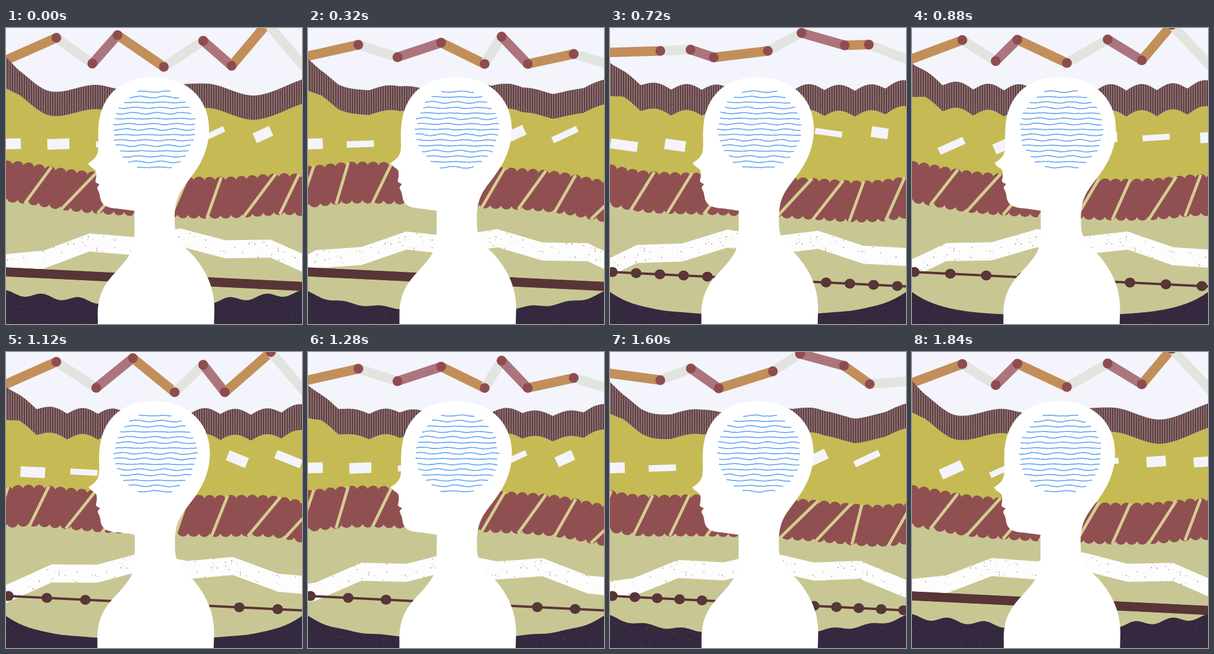
Animation, 500 px wide and 500 px high, one loop 1.92 s. Source, as an HTML page with a canvas:

```html
<!DOCTYPE html>
<html>
<head>
<meta charset="utf-8">
<style>
html, body { margin: 0; width: 100%; height: 100%; overflow: hidden; background: #f3f4fc; }
canvas { display: block; width: 500px; height: 500px; }
</style>
</head>
<body>
<canvas id="stage" width="500" height="500"></canvas>
<script>
const ctx = document.getElementById('stage').getContext('2d');
const FRAME = 80, COUNT = 24, TAU = Math.PI * 2;
const lerp = (a, b, t) => a + (b - a) * t;

// Two swings per loop: a plain one (-1 to 1) and one with a narrow peak (0 to 1)
const swing = (k, peak) => Math.cos(TAU * (k - peak) / 12);
const pulse = (k, peak) => ((1 + swing(k, peak)) / 2) ** 1.5;

function random(seed) {
  let s = seed * 7919 + 17;
  return () => {
    s = (s * 1664525 + 1013904223) % 4294967296;
    return s / 4294967296;
  };
}

// Smooth curve through [x, y] points, clamped at the ends
function curve(pts) {
  const last = pts.length - 1;
  const slope = i => {
    const a = pts[Math.max(i - 1, 0)], b = pts[Math.min(i + 1, last)];
    return (b[1] - a[1]) / (b[0] - a[0]);
  };
  return x => {
    if (x <= pts[0][0]) return pts[0][1];
    if (x >= pts[last][0]) return pts[last][1];
    let i = 0;
    while (pts[i + 1][0] < x) i++;
    const [x0, y0] = pts[i], [x1, y1] = pts[i + 1];
    const w = x1 - x0, t = (x - x0) / w, t2 = t * t, t3 = t2 * t;
    return y0 * (2 * t3 - 3 * t2 + 1) + y1 * (3 * t2 - 2 * t3) +
      w * (slope(i) * (t3 - 2 * t2 + t) + slope(i + 1) * (t3 - t2));
  };
}

// x, sway, sway peak, y, jump, jump peak
const joints = [
  [85, 0, 0, 16, 35, 7], [144.5, 8.5, 2.7, 61, -36, 7.1], [199, 26, 3.8, 10, 54, 7.3],
  [280, 19, 4.5, 68, -36, 7.6], [327, 7, 1, 22, -21, 7], [382.5, 14, 8.8, 68, -45, 7.8],
  [443, 6, 3.5, -8, 88, 6.2]
];

// lean, swing of the lean, peak
const slashes = [
  [25, 2, 0], [33, 14, 11], [42, 18, 0], [52, 5, 0], [40, 0, 0],
  [45, 22, 7.5], [44, 21, 6.7], [36, 22, 1], [48, 22, 4.5]
];

const smoothTop = curve([[0, 49], [25, 74], [75, 107], [150, 96], [200, 104], [340, 94], [420, 114], [500, 87]]);
const scallopTop = x => 106 - 46 * Math.exp(-x / 32) - 8 * (x / 500) ** 12 -
  11 * Math.abs(Math.sin(Math.PI * x / 51.7));

const edgeDistance = x => Math.min(x, 500 - x);
const groundRough = x => 447 + 0.095 * edgeDistance(x) + 4 * Math.cos(TAU * (edgeDistance(x) - 30) / 62);
const groundCalm = x => 446 + 40 * (1 - Math.exp(-edgeDistance(x) / 55));

const beadGap = curve([[4, 3], [7, 18], [11, 60.7], [14, 65], [18, 56.5], [23, 3]]);

// Heights and angles of the four dash stops, left and right of the head
const stops = [
  { y: [196, 198, 203, 199], angle: [-2, 8, 3, -24] },
  { y: [180, 177, 181, 185], angle: [-25, 8, 22, -4] }
];

const head = new Path2D('M155 515L155 490C154 460 161 440 179 419C199 397 217 380 217 355L217 309' +
  'C204 307 196 306 188 305C170 304 161 299 159 286C158 278 156 275 154 271C154 268 156 267 158 264' +
  'C153 262 151 261 151 258C152 254 153 250 152 243C151 237 142 236 138.5 229C145 224 154 219 155.5 207' +
  'C157 196 155 187 156 172C158 118 190 83 249 83C306 83 343 120 343 170C343 215 320 242 302 266' +
  'C288 285 284 300 285 330C285 358 300 368 315 383C340 412 352 440 352 475L351 515Z');

function band(top, bottom) {
  const p = new Path2D();
  for (let x = 0; x <= 500; x += 2) p.lineTo(x, top(x));
  for (let x = 500; x >= 0; x -= 2) p.lineTo(x, bottom(x));
  p.closePath();
  return p;
}

function fill(path, color) {
  ctx.fillStyle = color;
  ctx.fill(path);
}

function dot(x, y, r, color) {
  ctx.fillStyle = color;
  ctx.beginPath();
  ctx.arc(x, y, r, 0, TAU);
  ctx.fill();
}

function line(x0, y0, x1, y1, width, color) {
  ctx.lineWidth = width;
  ctx.strokeStyle = color;
  ctx.beginPath();
  ctx.moveTo(x0, y0);
  ctx.lineTo(x1, y1);
  ctx.stroke();
}

function clipped(path, draw) {
  ctx.save();
  ctx.clip(path);
  draw();
  ctx.restore();
}

function drawSky(k) {
  ctx.fillStyle = '#f3f4fc';
  ctx.fillRect(0, 0, 500, 500);
  const rnd = random(3);
  for (let i = 0; i < 70; i++) dot(rnd() * 500, rnd() * 110, 0.8, '#fff');

  const pts = joints.map(([x, sway, swayPeak, y, jump, jumpPeak]) =>
    [x + sway * swing(k, swayPeak), y + jump * pulse(k, jumpPeak)]);
  const chain = [[-5, 57 - 24 * pulse(k, 7)], ...pts, [505, 68 - 21 * pulse(k, 7)]];
  const colors = ['#c28f5a', '#e2e4df', '#ac757d'];
  for (let i = 0; i < 8; i++) line(...chain[i], ...chain[i + 1], 16, colors[i % 3]);
  pts.forEach(([x, y]) => dot(x, y, 8.3, '#8f4c50'));
}

function drawStripes(k) {
  const s = (1 - Math.cos(TAU * k / 23)) / 2;
  const top = x => lerp(smoothTop(x), scallopTop(x), s);
  const bottom = x => top(x) + 41 + 3 * s + 12 * Math.max(0, 1 - x / 22);
  fill(band(bottom, () => 300), '#c6ba54');
  const ribbon = band(top, bottom);
  fill(ribbon, '#5f3c3f');
  clipped(ribbon, () => {
    for (let x = 1; x < 500; x += 4) line(x, 40, x, 165, 1.2, '#a99694');
    const rnd = random(5);
    for (let i = 0; i < 250; i++) dot(rnd() * 500, 45 + rnd() * 115, 0.9, '#824a4c');
  });
}

// Dashes step one slot per frame; even ones get thin, odd ones get short.
function drawDashes(k) {
  for (let slot = 0; slot < COUNT; slot++) {
    const phase = (slot - k + COUNT) % 8;
    if (phase % 4) continue;
    const thin = Math.min(18, Math.max(10, 19 - 2 * Math.min(slot, COUNT - slot)));
    const [w, h] = phase ? [46 - 2.2 * (slot % 13), 18] : [46, thin];
    const { y, angle } = stops[slot < 12 ? 0 : 1];
    ctx.save();
    ctx.translate(slot * 21.6 + 2, y[slot % 4]);
    ctx.rotate(angle[slot % 4] * Math.PI / 180);
    ctx.fillStyle = '#f3f4fc';
    ctx.fillRect(-w / 2, -h / 2, w, h);
    ctx.restore();
  }
}

function drawRed(k) {
  const top = x => {
    const outer = Math.abs((x - 245) / 250) ** 3;
    return 233 + 0.045 * x + (10 - 4 * outer) * swing(k, 10.5 - 4.8 * outer);
  };
  const bottom = x => top(x) + 65;
  fill(band(x => top(x) + 32, () => 500), '#c8c793');
  fill(band(x => top(x) + 3, x => bottom(x) - 3), '#905051');
  for (let x = -3; x < 515; x += 9) {
    const upper = (x + 3) % 18 === 0;
    dot(x + 5, upper ? top(x + 5) + 7 : bottom(x + 5) - 7, 10, '#905051');
  }
  slashes.forEach(([lean, sway, peak], i) => {
    const foot = -22 + 61.5 * i + 9 * swing(k, 5);
    const tip = foot + lean + sway * swing(k, peak);
    line(tip, top(tip) - 2, foot, bottom(foot) + 2, 5, '#d5cc91');
  });
}

function drawSpeckled(k) {
  const step = 76.5, shift = k * step / 12;
  const verts = [];
  for (let i = -3; i < 8; i++) {
    const x = -12 + i * step + shift;
    verts.push([x, 338 + 0.00059 * (x - 265) ** 2 + (i % 2 ? 14 : 0)]);
  }
  const p = new Path2D();
  verts.forEach(([x, y]) => p.lineTo(x, y));
  verts.reverse().forEach(([x, y]) => p.lineTo(x, y + 30.5));
  p.closePath();
  fill(p, '#fdfdfe');
  clipped(p, () => {
    const rnd = random(11);
    for (let i = 0; i < 85; i++) {
      const x = rnd() * 2 * step, y = 335 + rnd() * 85, r = 0.4 + rnd() * 0.6;
      for (let n = -1; n < 4; n++) dot(x + shift + n * 2 * step, y, r, '#a97c78');
    }
  });
}

function drawBeads(k) {
  const gap = beadGap(k), r = 7.5 + 1.5 * Math.min(1, gap / 18);
  const y = x => 412 + 0.049 * x;
  line(0, y(0), 500, y(500), 4, '#583537');
  for (let x = 4 - Math.ceil(12 / gap) * gap; x < 512; x += gap) {
    ctx.fillStyle = '#583537';
    ctx.beginPath();
    ctx.ellipse(x, y(x), r, Math.min(r, 8.4), 0, 0, TAU);
    ctx.fill();
  }
}

function drawGround(k) {
  const s = Math.sin(Math.PI * k / 23);
  const ground = band(x => lerp(groundRough(x), groundCalm(x), s), () => 500);
  fill(ground, '#34293f');
  clipped(ground, () => {
    const rnd = random(k + 40);
    for (let i = 0; i < 260; i++)
      dot(rnd() * 500, 440 + rnd() * 60, 0.5 + rnd(), i % 2 ? '#2a2136' : '#43364f');
  });
}

function drawHead(k) {
  ctx.save();
  ctx.translate(252, 400);
  ctx.rotate(0.0065 * Math.min(1, 1.5 * Math.sin(Math.PI * k / 23)));
  ctx.translate(-252, -400);
  fill(head, '#fff');
  const rnd = random(k + 90);
  ctx.strokeStyle = '#62a5f0';
  ctx.lineWidth = 1.6;
  for (let row = 0; row < 15; row++) {
    const y = 107.5 + row * 9.12;
    const half = Math.sqrt(4900 - (y - 171.4) ** 2);
    const from = 251 - half + rnd() * 4 - 2, to = 251 + half + rnd() * 4 - 2;
    const amp = 1 + 0.5 * Math.sin(row * 2.1 + TAU * k / 8);
    ctx.beginPath();
    for (let x = from; x < to; x += 1.5)
      ctx.lineTo(x, y + amp * Math.cos((x - 251) / 6.6 + row * 0.6 + TAU * k / 12) + rnd() * 0.8 - 0.4);
    ctx.stroke();
  }
  ctx.restore();
}

const layers = [drawSky, drawStripes, drawDashes, drawRed, drawSpeckled, drawBeads, drawGround, drawHead];
const start = performance.now();
let shown = -1;

function tick() {
  const k = Math.floor((performance.now() - start) / FRAME) % COUNT;
  if (k !== shown) {
    shown = k;
    layers.forEach(draw => draw(k));
  }
  requestAnimationFrame(tick);
}
tick();
</script>
</body>
</html>
```
